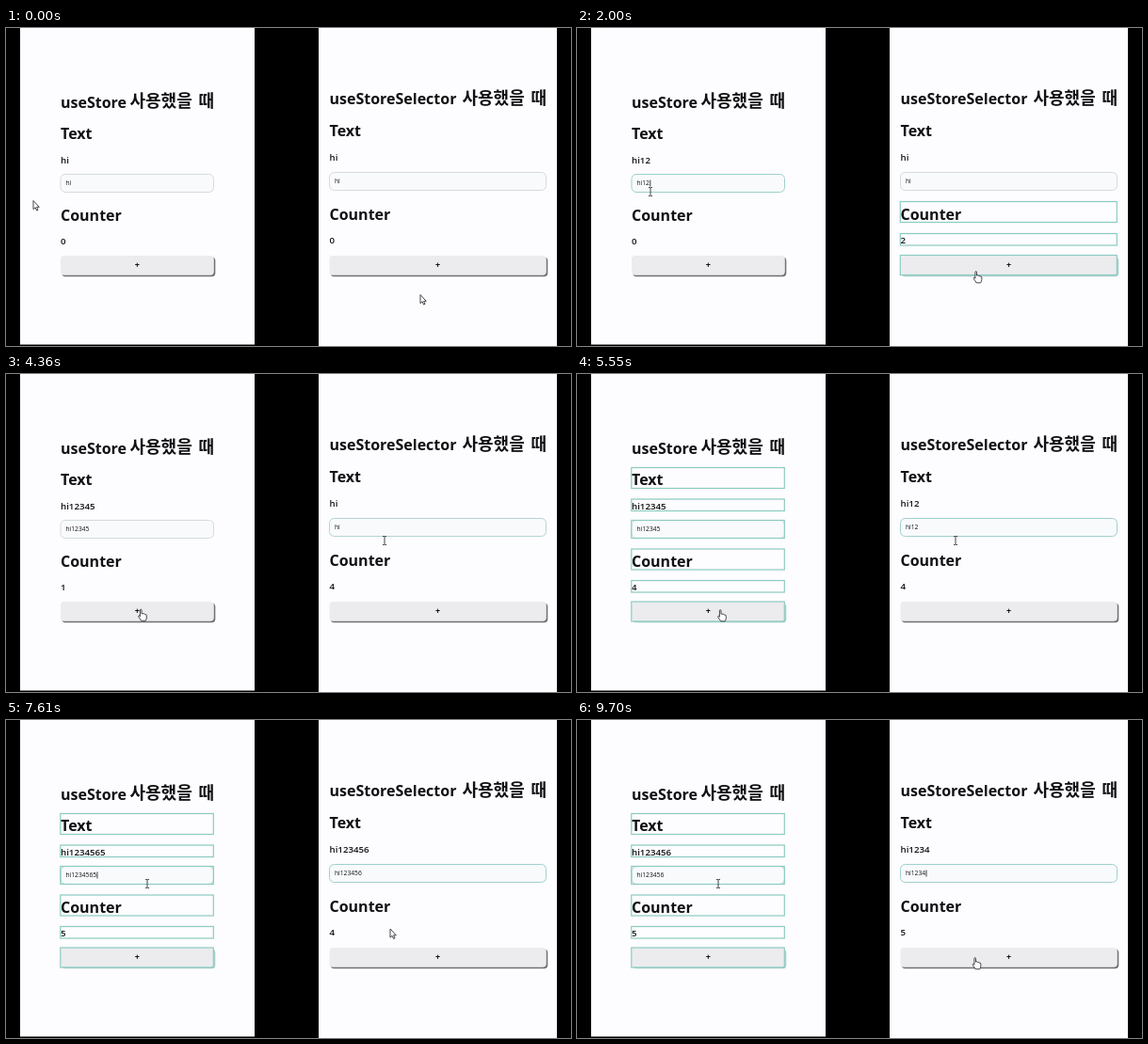
Animation of 600 by 338 pixels, one loop 9730 ms. Source, as an HTML page with a canvas:

```html
<!DOCTYPE html>
<html lang="ko">
<head>
<meta charset="utf-8">
<title>useStore / useStoreSelector</title>
<style>
  html, body { margin: 0; width: 100%; height: 100%; overflow: hidden; background: #000; }
  canvas { display: block; width: 600px; height: 338px; }
</style>
</head>
<body>
<canvas id="stage" width="600" height="338"></canvas>
<script>
const ctx = document.getElementById('stage').getContext('2d');
const LOOP = 9730;
const FLASH = 360;
const FADE = 60;
const INK = '#111113';
const LATIN = '"Open Sans", "Noto Sans", sans-serif';
const HANGUL = '"Noto Sans CJK KR", "Noto Sans CJK", "Noto Sans CJK JP", sans-serif';

// edits: [time, text, count]; focus: [time, level]; carets: [from, to]
// mouse: [time, x, y, shape]
const left = {
  title: 'useStore', x: 58, w: 162.5, panel: [15, 0, 249, 336.5],
  rows: { title: 84.5, head: 118, text: 143.5, input: 155.5, counter: 204.5, count: 230 },
  boxes: [[99.5, 22], [133, 12.5], [155.5, 19], [186, 22], [219.5, 12.5], [242, 21]],
  scope: { text: [0, 6], count: [0, 6] },
  edits: [
    [0, 'hi', 0], [850, 'hi1', 0], [1430, 'hi12', 0], [2090, 'hi123', 0],
    [2670, 'hi1234', 0], [2970, 'hi12345', 0], [3980, 'hi12345', 1],
    [4560, 'hi12345', 2], [5000, 'hi12345', 3], [5420, 'hi12345', 4],
    [6000, 'hi12345', 5], [6900, 'hi123456', 5], [7430, 'hi1234565', 5],
    [9580, 'hi123456', 5]
  ],
  focus: [[0, 0], [600, 1], [3950, 0], [6500, 1]],
  carets: [[600, 1130], [1430, 3500], [6500, 7960], [8490, 9020]],
  mouse: [
    [30, 29, 183.5, 'arrow'], [330, 78, 174, 'beam'], [3300, 78, 174, 'beam'],
    [3800, 145, 256.5, 'hand'], [4550, 145, 256.5, 'hand'], [4700, 154, 257, 'hand'],
    [5800, 154, 257, 'hand'], [6500, 150, 174, 'beam']
  ]
};
const right = {
  title: 'useStoreSelector', x: 343.5, w: 230, panel: [332, 0, 253, 338],
  rows: { title: 81, head: 115, text: 141, input: 153.5, counter: 203.5, count: 229 },
  boxes: [[96.5, 22], [131, 12.5], [153.5, 19], [184.5, 22], [218.5, 12.5], [241.5, 21]],
  scope: { text: [0, 3], count: [3, 6] },
  edits: [
    [0, 'hi', 0], [1400, 'hi', 1], [2000, 'hi', 2], [2640, 'hi', 3], [3180, 'hi', 4],
    [4600, 'hi1', 4], [4990, 'hi12', 4], [5680, 'hi123', 4], [6120, 'hi1234', 4],
    [6720, 'hi12345', 4], [7050, 'hi123456', 4], [8200, 'hi123456', 5],
    [8910, 'hi12345', 5], [9250, 'hi1234', 5]
  ],
  focus: [[0, 0], [3850, 0.6], [4550, 1], [8200, 0], [8700, 1]],
  carets: [[3850, 4330], [4600, 5450], [5680, 7560], [8700, 9780]],
  mouse: [
    [30, 440, 283.5, 'arrow'], [330, 452, 262, 'hand'], [600, 452, 262, 'hand'],
    [800, 425.5, 265, 'hand'], [3350, 425.5, 265, 'hand'], [3800, 402, 177, 'beam'],
    [7300, 402, 177, 'beam'], [7600, 408, 222, 'arrow'], [7700, 408, 222, 'arrow'],
    [8000, 425, 259, 'hand'], [8300, 425, 259, 'hand'], [8730, 402, 174, 'beam'],
    [9350, 402, 174, 'beam'], [9680, 424.5, 259, 'hand']
  ]
};

const clamp = v => Math.max(0, Math.min(1, v));
const ease = v => v * v * (3 - 2 * v);
const mix = (a, b, k) => a + (b - a) * k;
const blend = (a, b, k) => `rgb(${a.map((v, i) => Math.round(mix(v, b[i], k))).join()})`;
const lastIndex = (list, t) => list.reduce((found, item, i) => item[0] <= t ? i : found, 0);

function write(str, x, y, size, weight = 700, family = LATIN) {
  ctx.font = `${weight} ${size}px ${family}`;
  ctx.fillStyle = INK;
  ctx.fillText(str, x, y);
}

function round(x, y, w, h, r, fill, line) {
  ctx.beginPath();
  ctx.roundRect(x, y, w, h, r);
  ctx.fillStyle = fill;
  ctx.fill();
  if (line) {
    ctx.strokeStyle = line;
    ctx.lineWidth = 1;
    ctx.stroke();
  }
}

// Strength of the render highlight for each of the six boxes
function highlights(p, t) {
  const levels = [0, 0, 0, 0, 0, 0];
  p.edits.forEach(([time, text], i) => {
    if (!i || t < time || t > time + FLASH) return;
    const kind = text !== p.edits[i - 1][1] ? 'text' : 'count';
    const [from, to] = p.scope[kind];
    const level = clamp((time + FLASH - t) / FADE);
    for (let k = from; k < to; k++) levels[k] = Math.max(levels[k], level);
  });
  return levels;
}

function drawPanel(p, t) {
  const { x, w, rows } = p;
  const [, text, count] = p.edits[lastIndex(p.edits, t)];
  const focus = p.focus[lastIndex(p.focus, t)][1];
  const lit = highlights(p, t);

  ctx.fillStyle = '#fdfcfe';
  ctx.fillRect(...p.panel);

  write(p.title, x, rows.title, 16);
  write('사용했을', x + w - 89, rows.title - 0.5, 18, 700, HANGUL);
  write('때', x + w - 16, rows.title - 0.5, 18, 700, HANGUL);
  write('Text', x, rows.head, 16);
  write(text, x, rows.text, 9.7, 600);
  write('Counter', x, rows.counter, 16);
  write(String(count), x, rows.count, 9.7, 600);

  round(x, rows.input, w, 19, 5, '#f8fafc', blend([213, 218, 223], [158, 208, 205], focus));
  write(text, x + 5.5, rows.input + 11.8, 6.7, 400);
  if (p.carets.some(([from, to]) => t >= from && t < to)) {
    const end = x + 6 + ctx.measureText(text).width;
    ctx.fillRect(end, rows.input + 6, 0.8, 7);
  }

  round(x + 1.2, 243.4, w + 0.6, 20.8, 4, blend([112, 112, 116], [170, 208, 202], lit[5]));
  round(x, 242, w + 0.3, 20.8, 4, '#ececee');
  ctx.textAlign = 'center';
  write('+', x + w / 2, 255, 9);
  ctx.textAlign = 'left';

  ctx.strokeStyle = '#8ccbc1';
  ctx.lineWidth = 1.2;
  p.boxes.forEach(([y, h], i) => {
    ctx.globalAlpha = lit[i];
    ctx.strokeRect(x - 0.2, y, w, h);
  });
  ctx.globalAlpha = 1;
}

const shapes = {
  arrow: new Path2D('M0 0V9.2L2.1 7.3L3.6 10.5L5 9.9L3.6 6.8H6.3Z'),
  beam: new Path2D('M-2 -4.5H-.6L0 -4L.6 -4.5H2M0 -4V4M-2 4.5H-.6L0 4L.6 4.5H2'),
  hand: new Path2D('M-2.6 1.2V-5.4Q-2.6 -6.4 -1.8 -6.4T-1 -5.4V-1.8Q0 -2.8 .8 -1.5Q1.8 -2.2 2.6 -1' +
    'Q4.3 -1.3 4.3 .4V2.6Q4.2 4.3 3.2 5.8H-1.4Q-2.3 4 -4.2 1.6Q-4.7 .6 -3.8 .3T-2.6 1.2Z')
};

function drawMouse(keys, t) {
  const i = lastIndex(keys, t);
  const a = keys[i];
  const b = keys[i + 1] || a;
  const k = a === b ? 0 : ease(clamp((t - a[0]) / (b[0] - a[0])));
  const shape = k < 0.6 ? a[3] : b[3];
  ctx.save();
  ctx.translate(mix(a[1], b[1], k), mix(a[2], b[2], k));
  ctx.lineJoin = 'round';
  ctx.lineWidth = 0.9;
  ctx.strokeStyle = '#303034';
  if (shape !== 'beam') {
    ctx.fillStyle = '#fff';
    ctx.fill(shapes[shape]);
  }
  ctx.stroke(shapes[shape]);
  ctx.restore();
}

function draw(t) {
  ctx.fillStyle = '#000';
  ctx.fillRect(0, 0, 600, 338);
  for (const p of [left, right]) {
    drawPanel(p, t);
    drawMouse(p.mouse, t);
  }
}

const start = performance.now();
function tick() {
  draw((performance.now() - start) % LOOP);
  requestAnimationFrame(tick);
}
tick();
</script>
</body>
</html>
```
